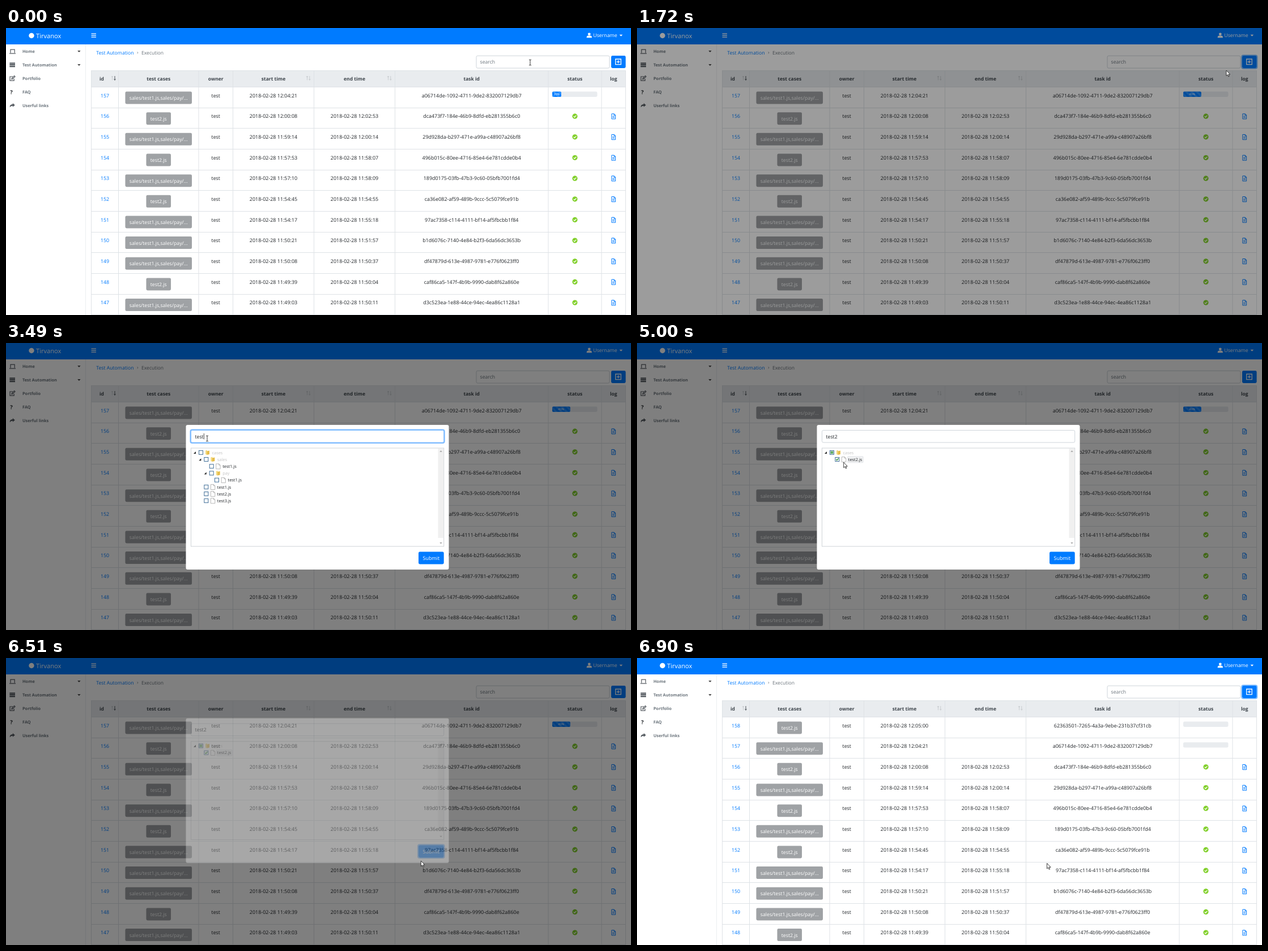
These frames come from a looping animation (1103x508 px, 8 s). An HTML page:

```html
<!DOCTYPE html>
<html lang="en">
<head>
<meta charset="utf-8">
<title>Test execution</title>
<style>
html, body { margin: 0; width: 100%; height: 100%; overflow: hidden; background: #fff; }
svg { display: block; width: 1103px; height: 508px; }
text { font-family: "Open Sans", "Noto Sans", sans-serif; text-rendering: geometricPrecision; fill: #212529; white-space: pre; }
.mid { text-anchor: middle; }
.bold { font-weight: 700; }
.link { fill: #007bff; }
.white { fill: #fff; }
.side { font-weight: 700; fill: #6c757d; }
.head { font-weight: 700; fill: #3d444b; }
.hint { fill: #6c757d; }
.faded { fill: #c4c4c4; }
.line { fill: none; stroke: #dee2e6; }
.icon { fill: none; stroke: #555b61; stroke-width: 1.2; }
.ring { fill: none; stroke: #007bff; stroke-width: 2; stroke-opacity: .5; }
</style>
</head>
<body>
<svg id="stage" viewBox="0 0 1103 508"></svg>
<script>
const LOOP = 8000, ROW = 36.66, TOP = 105, BLUE = '#007bff';
const stage = document.getElementById('stage');
const $ = id => document.getElementById(id);

const text = (x, y, size, str, cls = '') =>
  `<text x="${x}" y="${y}" font-size="${size}" class="${cls}">${str}</text>`;
const rect = (x, y, w, h, fill, r = 0, more = '') =>
  `<rect x="${x}" y="${y}" width="${w}" height="${h}" rx="${r}" fill="${fill}" ${more}/>`;
const path = (d, more) => `<path d="${d}" ${more}/>`;

// Page chrome

function topBar() {
  return rect(0, 0, 1103, 29, BLUE)
    + '<circle cx="45" cy="13.5" r="4.7" fill="#fff"/>'
    + text(53, 17.6, 11.1, 'Tirvanox', 'white')
    + path('M150.5 10.2h8.5M150.5 13.2h8.5M150.5 16.2h8.5', 'stroke="#fff" stroke-width="1.3"')
    + '<circle cx="1029.3" cy="10.8" r="2.4" fill="#fff"/>'
    + path('M1024.7 17.3v-1.2q0-2.4 2.6-2.6h4q2.6.2 2.6 2.6v1.2z', 'fill="#fff"')
    + text(1036.3, 16.4, 8.75, 'Username', 'white')
    + path('M1082.6 11.8h5.6l-2.8 2.9z', 'fill="#fff"');
}

function sideBar() {
  const icons = [
    path('M8 44v-5.8h7.2V44M6 45.2h11', 'class="icon"'),
    path('M6.4 62.3h9.6M6.4 65.2h9.6M6.4 68.1h9.6', 'class="icon" stroke-width="2.2" style="stroke-width:2.2"'),
    path('M12 86H7v7.2h7.2V90M10 90.6l.4-1.8 4.3-4.2 1.3 1.3-4.3 4.2z', 'class="icon"'),
    text(7.2, 116.6, 9.5, '?', 'bold'),
    path('M6.8 140.4q-.6-5.2 5-5.4v-2l4 3.4-4 3.4v-2q-3.600-.2-5 2.600z', 'fill="#555b61"')
  ];
  const labels = ['Home', 'Test Automation', 'Portfolio', 'FAQ', 'Userful links'];
  return path('M140.500 29V508', 'stroke="#eceef0"') + icons.join('')
    + labels.map((s, i) => text(29, 44.2 + i * 23.9, 7.35, s, 'side')).join('')
    + [40, 64].map(y => path(`M126.200 ${y}h5.400l-2.700 2.900z`, 'fill="#444"')).join('');
}

function toolBar() {
  return text(159.2, 46.5, 8.7, 'Test Automation', 'link')
    + text(231, 46.3, 8.7, '›', 'hint') + text(239, 46.5, 8.6, 'Execution', 'hint')
    + rect(830, 49.2, 235, 21.8, '#fff', 2.4, 'stroke="#ced4da"')
    + text(836.5, 63.3, 8.7, 'search', 'hint')
    + rect(1067.2, 48.200, 27.200, 23.600, 'none', 3, 'id="addRing" class="ring"')
    + rect(1068, 49, 25.6, 22, BLUE, 2.4, 'id="add"')
    + path('M1075.700 55h9.600v9.600h-9.600zM1080.500 57v5.600M1077.700 59.800h5.600',
      'fill="none" stroke="#fff" stroke-width="1.3"');
}

// Table

const COLS = [150.5, 198.5, 340, 400.5, 543.5, 686.5, 957, 1051, 1093.5];
const mid = i => (COLS[i] + COLS[i + 1]) / 2;

const RUNS = `158|s|12:05:00||62363501-7265-4a3a-9ebe-231b37cf31cb
157|l|12:04:21||a06714de-1092-4711-9de2-832007129db7
156|s|12:00:08|12:02:53|dca473f7-184e-46b9-8dfd-eb281355b6c0
155|l|11:59:14|12:00:14|29d928da-b297-471e-a99a-c48907a26bf8
154|s|11:57:53|11:58:07|496b015c-80ee-4716-85e4-6e781cdde0b4
153|l|11:57:10|11:58:09|189d0175-03fb-47b3-9c60-05bfb7001fd4
152|s|11:54:45|11:54:55|ca36e082-af59-489b-9ccc-5c5079fce91b
151|l|11:54:17|11:55:18|97ac7358-c114-4111-bf14-af5fbcbb1f84
150|l|11:50:21|11:51:57|b1d6076c-7140-4e84-b2f3-6da56dc3653b
149|l|11:50:08|11:50:37|df47879d-613e-4987-9781-e776f0623ff0
148|s|11:49:39|11:50:04|caf86ca5-147f-4b9b-9990-dab8f62a860e
147|l|11:49:03|11:50:11|d3c523ea-1e88-44ce-94ec-4ea86c1128a1`.split('\n').map(s => s.split('|'));

function runRow([id, kind, start, end, task], i) {
  const long = kind === 'l', w = long ? 117.6 : 43.6, y = 17.8;
  const day = s => '2018-02-28 ' + s;
  let out = text(mid(0), y, 8.85, id, 'link mid')
    + rect(mid(1) - w / 2, 7.500, w, 22, '#9fa2a5', 2.4)
    + text(mid(1), 22, 8.75, long ? 'sales/test1.js,sales/pay/...' : 'test2.js', 'white mid')
    + text(mid(2), y, 8.75, 'test', 'mid')
    + text(mid(3), y, 8.95, day(start), 'mid')
    + text(mid(5), y, 8.95, task, 'mid');
  if (end) {
    out += text(mid(4), y, 8.95, day(end), 'mid')
      + `<circle cx="${mid(6)}" cy="14.5" r="4.6" fill="#82d02c"/>`
      + path(`M${mid(6) - 2.3} 14.6l1.700 1.700 3-3.300`, 'fill="none" stroke="#fff" stroke-width="1.3"')
      + path('M1068.900 10.200h4.400l2.300 2.300v6.800h-6.700zM1073 10.200v2.500h2.600M1070.400 14.600h3.700M1070.400 16.800h3.700',
        `fill="none" stroke="${BLUE}" stroke-width="1"`);
  } else {
    out += rect(964, 7.500, 79.500, 9.400, '#e9ecef', 2.4);
    if (i === 1) out += '<g id="bar">' + rect(964, 7.500, 0, 9.400, BLUE, 2, 'class="fill"')
      + rect(964, 7.500, 0, 9.400, 'url(#stripes)', 2, 'class="fill"')
      + text(972, 14.2, 5.4, '', 'white mid') + '</g>';
  }
  return `<g ${i ? '' : 'id="newest"'} transform="translate(0 ${TOP + (i - 1) * ROW})">${out}</g>`;
}

function table() {
  const names = ['id', 'test cases', 'owner', 'start time', 'end time', 'task id', 'status', 'log'];
  const up = x => `M${x} 92.300v-7.300m-1.500 2l1.500-2 1.500 2`;
  const down = x => `M${x} 85v7.300m-1.500-2l1.500 2 1.500-2`;
  const arrow = (d, c) => path(d, `fill="none" stroke="${c}" stroke-width=".9"`);
  const pale = '#c6cacd';
  let grid = 'M150 75.5H1094';
  for (let i = 0; i < 12; i++) grid += `M150 ${Math.round(TOP + i * ROW) - .5}H1094`;
  COLS.forEach(x => grid += `M${x} 75V508`);
  return rect(150, 75, 944, 30, '#e9ecef') + path(grid, 'class="line"')
    + names.map((s, i) => text(i ? mid(i) : 169, 93, 8.5, s, 'head mid')).join('')
    + arrow(up(187.5), pale) + arrow(down(192), '#3d444b')
    + [531.5, 674.5].map(x => arrow(up(x) + down(x + 4.3), pale)).join('')
    + `<g id="rows">${RUNS.map(runRow).join('')}</g>`;
}

// Dialog, drawn from its own top edge

function dialog() {
  return rect(317.500, 0, 464, 256, '#fff', 3)
    + rect(325.500, 8.500, 448.200, 23.600, 'none', 3, 'id="inputRing" class="ring"')
    + rect(326.500, 9.500, 446.200, 21.600, '#fff', 2.4, 'id="input" stroke="#ced4da"')
    + text(333.4, 23.800, 8.75, '', '').replace('<text', '<text id="query"')
    + rect(349, 15, .8, 10.500, '#222', 0, 'id="caret"')
    + rect(326.500, 41, 446.200, 174, '#fff', 0, 'stroke="#cfd3d7"')
    + rect(762.500, 42, 9.700, 158, '#f0f0f0')
    + path('M765.200 47.700h4.600l-2.300-2.500zM765.200 208h4.600l-2.300 2.500z', 'fill="#a3a3a3"')
    + '<g id="tree"></g>'
    + rect(727, 223.700, 46.600, 23.600, 'none', 3, 'id="submitRing" class="ring"')
    + rect(728, 224.500, 44.700, 22, BLUE, 2.4, 'id="submit"')
    + text(750.3, 239, 8.95, 'Submit', 'white mid');
}

const FILES = [[0, 'cases'], [1, 'sales'], [2, 'test1.js'], [2, 'pay'], [3, 'test1.js'], [1, 'test1.js'],
  [1, 'nudla.png'], [1, '4.png'], [1, '3xx.png'], [1, 'test2.js'], [1, 'quorbi.png'], [1, 'test3.js'], [1, 'yy.png']];

const isFile = name => name.includes('.');

function visible(query) {
  const hit = ([, name]) => isFile(name) && name.includes(query);
  return FILES.filter((f, i) => {
    if (isFile(f[1])) return hit(f);
    const next = FILES.findIndex((g, j) => j > i && g[0] <= f[0]);
    return FILES.slice(i + 1, next < 0 ? FILES.length : next).some(hit);
  });
}

function tree(query, checked) {
  return visible(query).map(([depth, name], i) => {
    const x = 340 + depth * 9.35, y = 48.9 + i * 12.2, file = isFile(name);
    let out = rect(x + .5, y - 3.600, 7, 7, '#fdfdfb', 0, 'stroke="#2d608f" stroke-width=".9"');
    if (checked && !file) out += rect(x + 1.700, y - 2.400, 4.600, 4.600, '#5aa963');
    if (checked && file) {
      out += path(`M${x + 2} ${y - .200}l1.500 1.700 2.700-3.400`, 'fill="none" stroke="#218a2c" stroke-width="1.3"')
        + rect(x + 22.300, y - 5.300, 27.500, 11, '#f0f1f2', 1, 'stroke="#dcdfe2" stroke-width=".7"');
    }
    if (file) {
      out += path(`M${x + 12} ${y - 4.500}h5l2.400 2.400v6.700h-7.400zM${x + 17} ${y - 4.500}v2.400h2.400`,
        'fill="#fff" stroke="#9a9a9a" stroke-width=".7"');
    } else {
      out += path(`M${x - 5} ${y - 1.900}v4h-4z`, 'fill="#222"')
        + path(`M${x + 12} ${y - 3.500}l3-1v8.500l-3-.8z`, 'fill="#f5dc82"')
        + path(`M${x + 14.500} ${y - 2.500}l4.500-1v6.500l-4.500 1z`, 'fill="#e6bd4c"');
    }
    return out + text(x + 23.5, y + 2.700, 7.4, name, query && !file ? 'faded' : '');
  }).join('');
}

const S = 9.35;
stage.innerHTML = `<defs><pattern id="stripes" x="964" y="7.5" width="${S}" height="${S}" patternUnits="userSpaceOnUse">
  <path fill="#fff" fill-opacity=".17" d="M0 ${S / 2}V${S}H${S / 2}zM0 0H${S / 2}L${S} ${S / 2}V${S}z"/></pattern></defs>`
  + rect(0, 0, 1103, 508, '#fff') + table() + topBar() + sideBar() + toolBar()
  + rect(0, 0, 1103, 508, '#000', 0, 'id="shade"')
  + `<g id="dialog">${dialog()}</g>`
  + '<g id="pointer">'
  + path('M0 0V9.600L2.200 7.600 3.700 11 5.200 10.300 3.700 7.100H6.600z', 'fill="#fff" stroke="#111" stroke-width=".8"')
  + path('M-2-5Q0-5 0-4V4Q0 5-2 5M2-5Q0-5 0-4M2 5Q0 5 0 4', 'fill="none" stroke="#222" stroke-width=".9"')
  + path('M-1 .600Q0-.800 1 .600V4.600L5 5.600Q6 6 5.800 7.500L5 12.500H0L-3.400 8Q-3.600 6.600-2.400 6.800L-1 8z',
    'fill="#fff" stroke="#111" stroke-width=".8"')
  + '</g>';

// Timing: [start, number of equal steps until the next start]

const BEATS = [[0, 1], [120, 8], [1150, 1], [1300, 2], [1570, 1], [1720, 2], [1960, 1], [2110, 2], [2410, 6],
  [3250, 2], [3490, 1], [3640, 6], [4460, 1], [4610, 7], [5580, 1], [5700, 5], [6360, 1], [6510, 1],
  [6630, 1], [6780, 1], [6900, 1]];

function hold(t) {
  const i = BEATS.findLastIndex(b => b[0] <= t);
  const [start, n] = BEATS[i], step = ((BEATS[i + 1] || [LOOP])[0] - start) / n;
  return start + Math.floor((t - start) / step + 1e-6) * step;
}

// Pointer: time, x, y, shape (0 arrow, 1 text, 2 hand)
const MOVES = [[0, 925, 61, 1], [250, 930, 61, 1], [760, 1050, 61, 1], [890, 1088, 61, 2], [1300, 1081, 60, 2],
  [1570, 1079.500, 60, 2], [1720, 1040, 75, 0], [1960, 338.700, 225.700, 0], [2110, 340, 210, 0],
  [2300, 355, 169, 1], [4060, 355, 169, 1], [4200, 354, 185, 0], [4460, 353, 205, 0], [4870, 353, 206, 0],
  [5440, 742, 376, 2], [5580, 748, 379, 2], [6100, 748, 379, 2], [6230, 744, 366, 0],
  [6360, 739, 356, 0], [6630, 727, 361.500, 0], [6900, 723.500, 363.300, 0]];

const KEYS = [[2690, 't'], [2830, 'e'], [2970, 's'], [3110, 't'], [3900, '2']];

const ramp = (t, a, b) => Math.min(1, Math.max(0, (t - a) / (b - a)));
const easeOut = p => 1 - (1 - p) ** 2;
const show = (id, on) => { $(id).style.display = on ? '' : 'none'; };

function movePointer(t) {
  const i = MOVES.findLastIndex(m => m[0] <= t), a = MOVES[i], b = MOVES[i + 1] || a;
  const p = a === b ? 0 : ramp(t, a[0], b[0]);
  $('pointer').setAttribute('transform', `translate(${a[1] + (b[1] - a[1]) * p} ${a[2] + (b[2] - a[2]) * p})`);
  [...$('pointer').children].forEach((c, k) => { c.style.display = k === a[3] ? '' : 'none'; });
  return a;
}

let treeKey;
function draw(t) {
  const [, , py, shape] = movePointer(t);

  const added = t >= 6600;
  show('newest', added);
  $('rows').setAttribute('transform', `translate(0 ${added ? ROW : 0})`);
  show('bar', !added);
  const pct = t < 640 ? 20 : 40, width = 79.5 * pct / 100;
  document.querySelectorAll('.fill').forEach(r => r.setAttribute('width', width));
  const label = $('bar').querySelector('text');
  label.textContent = pct + '%';
  label.setAttribute('x', 964 + width / 2);
  $('stripes').setAttribute('patternTransform', `translate(${-S * (t % 1000) / 1000} 0)`);

  $('add').setAttribute('fill', shape === 2 && py < 100 ? '#0062cc' : BLUE);
  show('addRing', (t >= 1560 && t < 2500) || t >= 6700);
  $('shade').setAttribute('opacity', .5 * (ramp(t, 1603, 1753) - ramp(t, 6560, 6720)));

  const lift = 1 - easeOut(ramp(t, 1753, 2053)) + easeOut(ramp(t, 6400, 6700));
  $('dialog').setAttribute('transform', `translate(0 ${145 - 64 * lift})`);
  $('dialog').setAttribute('opacity', ramp(t, 1753, 1903) - ramp(t, 6400, 6560));

  const query = KEYS.filter(k => k[0] <= t).map(k => k[1]).join('');
  const checked = t >= 4800, focus = t >= 2500 && !checked;
  $('query').textContent = query || 'search';
  $('query').setAttribute('class', query ? '' : 'hint');
  $('input').setAttribute('stroke', focus ? '#80bdff' : '#ced4da');
  show('inputRing', focus);
  show('caret', focus && Math.floor((t + 100) / 530) % 2 === 0);
  $('caret').setAttribute('x', 333.6 + (query ? $('query').getComputedTextLength() : 0));
  $('submit').setAttribute('fill', shape === 2 && py > 100 ? '#0069d9' : BLUE);
  show('submitRing', t >= 5950);

  const key = query + checked;
  if (key !== treeKey) $('tree').innerHTML = tree(query, checked);
  treeKey = key;
}

const began = performance.now();
function tick() {
  draw(hold((performance.now() - began) % LOOP));
  requestAnimationFrame(tick);
}
tick();
</script>
</body>
</html>
```
